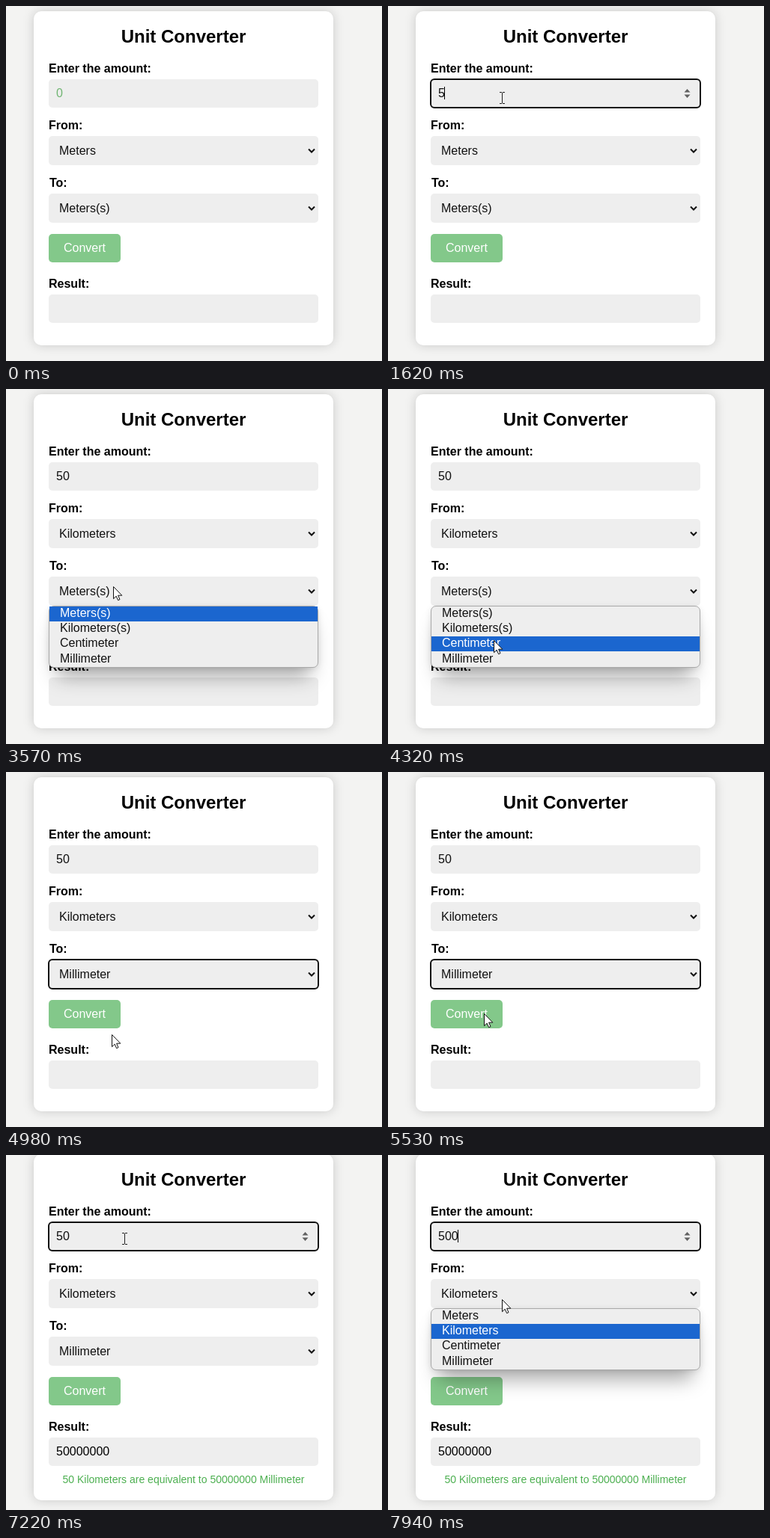
An HTML page for the animation above (8000 ms loop, 502 px wide and 475 px high).

```html
<!DOCTYPE html>
<html lang="en">
<head>
<meta charset="utf-8">
<title>Unit Converter</title>
<style>
html, body { margin: 0; width: 100%; height: 100%; overflow: hidden; background: #f3f3f2; }
svg { display: block; width: 502px; height: 475px; }
text { font: 16px "Liberation Sans", Arial, sans-serif; white-space: pre; }
.b { font-weight: bold; }
.ring { fill: none; stroke: #101010; stroke-width: 2; }
.field { fill: #eee; }
</style>
</head>
<body>
<svg id="stage" viewBox="0 0 502 475">
  <defs>
    <filter id="soft" x="-20%" y="-20%" width="140%" height="140%"><feGaussianBlur stdDeviation="7"/></filter>
    <filter id="deep" x="-30%" y="-100%" width="160%" height="300%"><feGaussianBlur stdDeviation="13"/></filter>
    <filter id="near" x="-20%" y="-50%" width="140%" height="200%"><feGaussianBlur stdDeviation="4"/></filter>
  </defs>
  <rect width="502" height="475" fill="#f3f3f2"/>
  <g id="page">
    <rect id="shade" x="37" y="7" width="400" rx="10" fill-opacity=".18" filter="url(#soft)"/>
    <rect id="card" x="37" y="7" width="400" rx="10" fill="#fff"/>
    <text class="b" x="237" y="49" text-anchor="middle" style="font-size:24px">Unit Converter</text>
    <text class="b" x="57" y="89">Enter the amount:</text>
    <text class="b" x="57" y="165">From:</text>
    <text class="b" x="58" y="242">To:</text>
    <text class="b" x="57" y="377">Result:</text>
    <rect class="field" x="57" y="98" width="360" height="38" rx="5"/>
    <rect class="field" x="57" y="174" width="360" height="39" rx="5"/>
    <rect class="field" x="57" y="251" width="360" height="39" rx="5"/>
    <rect class="field" x="57" y="386" width="360" height="38" rx="5"/>
    <text id="amount" x="67" y="122"></text>
    <text id="from" x="71" y="199"></text>
    <text id="to" x="71" y="276"></text>
    <text id="result" x="67" y="410"></text>
    <text id="note" x="237" y="447" text-anchor="middle" fill="#4caf50" style="font-size:14px"></text>
    <path d="M404 191.5l4 4 4-4M404 268.5l4 4 4-4" fill="none" stroke="#101010" stroke-width="2"/>
    <path id="spin" d="M395.5 115.5l4-4.5 4 4.5zM395.5 118.5l4 4.5 4-4.5z" fill="#606060"/>
    <rect x="57" y="305" width="96" height="38" rx="5" fill="#83c88a"/>
    <text x="77" y="329" fill="#fff">Convert</text>
    <rect id="ring" class="ring" x="57" width="360" rx="5"/>
    <rect id="caret" y="108" width="1" height="17"/>
    <g id="menu">
      <rect x="67" y="24" width="340" height="72" rx="8" fill-opacity=".32" filter="url(#deep)"/>
      <rect x="58" y="3" width="358" height="80" rx="7" fill-opacity=".14" filter="url(#near)"/>
      <rect x="57.5" y=".5" width="359" height="82" rx="6.5" fill="#eee" stroke="#a9a9a9"/>
      <rect id="mark" x="58" width="358" height="20" fill="#1b66cf"/>
    </g>
  </g>
  <path id="arrow" d="M.5.5V16.7L4.2 13.2 6.6 18.7 9 17.6 6.6 12.2H11.8Z" fill="#fff" stroke="#111" stroke-linejoin="round"/>
  <path id="beam" d="M-3 -7.5H0M1 -7.5H4M.5 -7V7M-3 7.5H0M1 7.5H4" fill="none" stroke="#222"/>
</svg>
<script>
const LOOP = 8000;
const el = id => document.getElementById(id);
const show = (id, on) => el(id).setAttribute('visibility', on ? 'visible' : 'hidden');
const set = (id, attrs) => { for (const k in attrs) el(id).setAttribute(k, attrs[k]); };

// Pointer path: time, x, y
const path = [
  [70, 160, 358], [400, 152, 100], [540, 152, 104], [670, 152, 123],
  [1930, 152, 123], [2290, 152, 195], [2360, 152, 195], [2500, 159, 239],
  [2650, 159, 239], [2700, 159, 236], [2950, 159, 236], [3370, 143, 264],
  [3640, 143, 264], [4320, 141, 336], [4580, 141, 336], [4650, 141, 351],
  [5110, 141, 351], [5530, 128, 323], [5880, 128, 323], [6430, 156, 171],
  [6690, 158, 112], [7550, 158, 112], [7740, 152, 193]
];

// Value held from each listed time on
const steps = {
  amount: [[0, ''], [1620, '5'], [1760, '50'], [7550, '500']],
  from: [[0, 'Meters'], [2950, 'Kilometers']],
  to: [[0, 'Meters(s)'], [4910, 'Millimeter']],
  focus: [[0, ''], [670, 'amount'], [2360, ''], [2950, 'from'], [3570, ''],
    [4910, 'to'], [5600, ''], [6720, 'amount']],
  menu: [[0, ''], [2290, 'from'], [2950, ''], [3570, 'to'], [4910, ''], [7940, 'from']],
  blink: [[0, 670], [1620, 1620], [1760, 1760], [6720, 6720], [7550, 7550]]
};
const DONE = 5670;
const boxes = { amount: [98, 38], from: [174, 39], to: [251, 39] };
const lists = {
  from: ['Meters', 'Kilometers', 'Centimeter', 'Millimeter'],
  to: ['Meters(s)', 'Kilometers(s)', 'Centimeter', 'Millimeter']
};

const rows = [15, 35, 55, 76].map(y => {
  const row = document.createElementNS('http://www.w3.org/2000/svg', 'text');
  row.setAttribute('x', 72);
  row.setAttribute('y', y);
  return el('menu').appendChild(row);
});

function held(name, t) {
  let value;
  for (const [at, v] of steps[name]) if (t >= at) value = v;
  return value;
}

function pointer(t) {
  const i = path.findIndex(p => p[0] > t);
  if (i < 0) return path[path.length - 1].slice(1);
  const [a, b] = [path[i - 1] || path[0], path[i]];
  const k = b[0] > a[0] ? (t - a[0]) / (b[0] - a[0]) : 0;
  return [1, 2].map(n => Math.round(a[n] + (b[n] - a[n]) * k));
}

function drawMenu(name, value, y, shift) {
  show('menu', name);
  if (!name) return;
  const top = boxes[name][0] + 39;
  const list = lists[name];
  const over = Math.floor((y - shift - top - 1) / 20);
  const pick = over >= 0 ? Math.min(over, 3) : list.indexOf(value);
  set('menu', { transform: `translate(0 ${top})` });
  set('mark', { y: 1 + 20 * pick });
  rows.forEach((row, i) => {
    row.textContent = list[i];
    row.setAttribute('fill', i === pick ? '#fff' : '#111');
  });
}

function draw(t) {
  const done = t >= DONE;
  const shift = done ? -8 : 0;
  const [x, y] = pointer(t);
  const amount = held('amount', t);
  const focus = held('focus', t);
  const menu = held('menu', t);
  const inside = !menu && y - shift >= 98 && y - shift < 136;

  set('page', { transform: `translate(0 ${shift})` });
  set('shade', { height: done ? 463 : 447 });
  set('card', { height: done ? 463 : 447 });
  el('amount').textContent = amount || '0';
  set('amount', { fill: amount ? '#111' : '#70b572' });
  for (const id of ['from', 'to']) {
    el(id).textContent = held(id, t);
    set(id, { fill: '#111' });
  }
  el('result').textContent = done ? '50000000' : '';
  el('note').textContent = done ? '50 Kilometers are equivalent to 50000000 Millimeter' : '';

  show('ring', focus);
  if (focus) set('ring', { y: boxes[focus][0], height: boxes[focus][1] });
  show('spin', inside || focus === 'amount');
  const phase = (t - held('blink', t)) % 1000;
  show('caret', focus === 'amount' && phase < 500);
  set('caret', { x: [67, 75, 84, 93][amount.length] });
  drawMenu(menu, menu && held(menu, t), y, shift);

  show('arrow', t >= 70 && !inside);
  show('beam', t >= 70 && inside);
  set('arrow', { transform: `translate(${x} ${y})` });
  set('beam', { transform: `translate(${x} ${y})` });
}

const start = performance.now();
function tick() {
  draw((performance.now() - start) % LOOP);
  requestAnimationFrame(tick);
}
tick();
</script>
</body>
</html>
```
